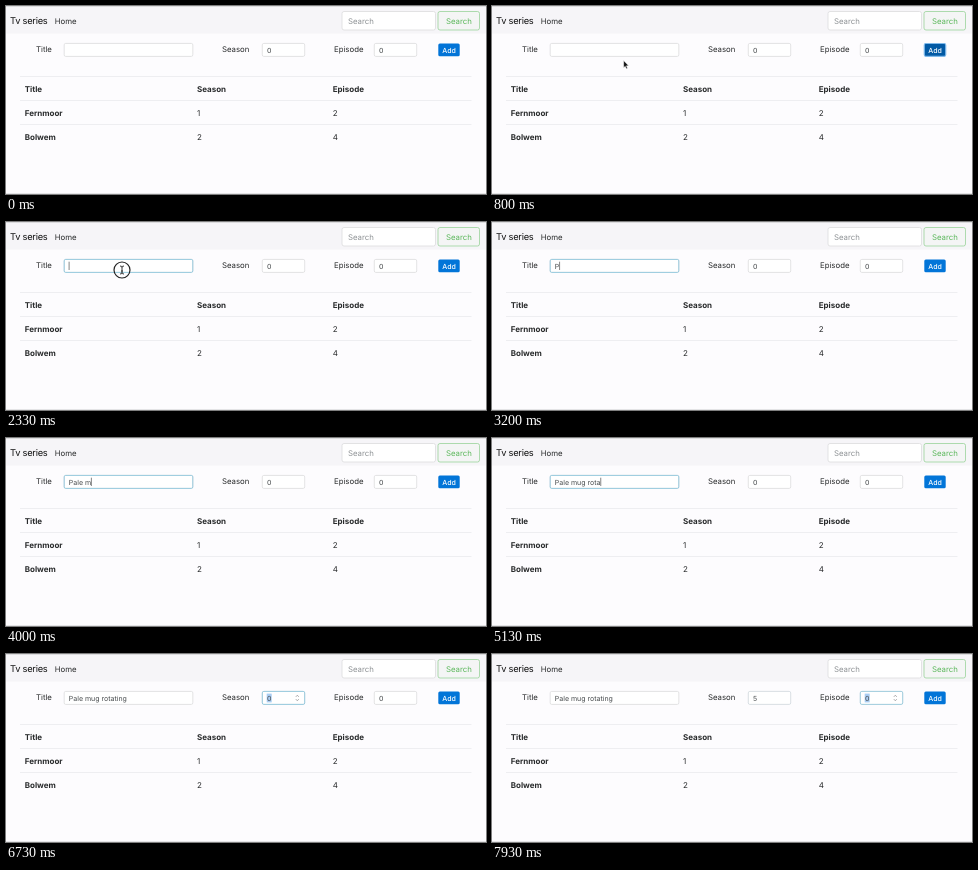
Animation of 480x188 px, one loop 8000 ms. Source, as an HTML page:

```html
<!DOCTYPE html>
<html lang="en">
<head>
<meta charset="utf-8">
<title>Tv series</title>
<style>
html, body { margin: 0; height: 100%; overflow: hidden; background: #fdfcfe; }
svg { display: block; width: 100vw; height: 100vh; }
text { font: 7.8px Inter, "Open Sans", sans-serif; fill: #292b2c; white-space: pre; text-rendering: geometricPrecision; }
.brand { font-size: 9.3px; letter-spacing: -.25px; fill: #111; }
.hint { fill: #8f9396; }
.green { fill: #5cb85c; }
.cell { font-size: 8px; }
.bold { font-weight: 650; }
.small { font-size: 7px; fill: #464a4c; }
.add { font-size: 7px; font-weight: 500; fill: #fff; text-anchor: middle; }
.box { fill: #fff; stroke: #dcdcde; stroke-width: .8; }
.focus { fill: none; stroke: #8fc8de; stroke-width: .9; }
.rule { stroke: #eeeef1; }
.select { fill: #a9cdf3; }
.caret { stroke: #333; stroke-width: .6; }
.arrows { fill: none; stroke: #8d8d90; stroke-width: .7; }
</style>
</head>
<body>
<svg viewBox="0 0 480 188">
  <rect width="480" height="188" fill="#fdfcfe"/>
  <rect width="480" height="27.5" fill="#f6f5f8"/>
  <path d="M0 .5H480" stroke="#dcdcde"/>
  <path d="M0 187.5H480" stroke="#e4e4e6"/>
  <text class="brand" x="4" y="18.2">Tv series</text>
  <text x="48.8" y="18">Home</text>
  <rect class="box" x="336" y="5.5" width="93.5" height="18.5" rx="2"/>
  <text class="hint" x="342" y="17.8">Search</text>
  <rect x="432" y="5.5" width="41.5" height="18.5" rx="2" fill="#f4f5f5" stroke="#8fce8f" stroke-width=".7"/>
  <text class="green" x="440" y="17.8">Search</text>

  <g id="form"></g>
  <rect x="432.3" y="37.5" width="21.4" height="12.8" rx="1.5" fill="#0275d8"/>
  <rect id="addFocus" x="432.3" y="37.5" width="21.4" height="12.8" rx="1.5" fill="#025aa5" stroke="#7fb9ea" stroke-width="1.2"/>
  <text class="add" x="443" y="46.5">Add</text>

  <path class="rule" d="M14 70.5H465.5M14 118.5H465.5"/>
  <path class="rule" d="M14 94.5H465.5" stroke-width="1.2"/>
  <g id="table"></g>

  <path id="caret" class="caret" d="M0 39.7V48"/>
  <path id="arrow" d="M0 0V7.2L1.6 5.7L2.7 8.2L3.9 7.7L2.8 5.2H5Z" fill="#111" stroke="#fff" stroke-width=".5"/>
  <g id="beam" fill="none" stroke="#222">
    <path d="M-2 -4Q0 -4 0 -2.8Q0 -4 2 -4M0 -3V3M-2 4Q0 4 0 2.8Q0 4 2 4M-1 1H1" stroke-width=".9"/>
    <circle id="press" r="8" stroke-width="1.2"/>
  </g>
</svg>
<script>
const LOOP = 8000;
const PHRASE = "Pale mug rotating";
const KEY_TIMES = [3200, 3360, 3530, 3680, 3790, 3930, 4190, 4390, 4590,
                   4690, 4830, 4950, 5080, 5290, 5460, 5525, 5725];
const PRESS = 2050, RELEASE = 2450, TO_SEASON = 6050, FIVE = 7190, TO_EPISODE = 7800;
// time, x, y of the pointer
const PATH = [[70, 215, 138], [870, 131, 54], [1270, 127, 42], [1400, 127, 42], [1750, 116, 48]];

const $ = id => document.getElementById(id);
const show = (el, on) => el.setAttribute("opacity", +on);
const clamp = v => Math.min(1, Math.max(0, v));
const fade = (t, from, to) => clamp((t - from) / 150) * (1 - clamp((t - to) / 150));

function addField(name, label, labelX, x, width, numeric) {
  const extras = numeric ? `
    <rect id="${name}Select" class="select" x="${x + 4.4}" y="39.6" width="5" height="8.8"/>
    <path id="${name}Spin" class="arrows" d="M${x + 33.5} 42.9l1.5 -1.7l1.5 1.7m-3 2.2l1.5 1.7l1.5 -1.7"/>` : "";
  $("form").innerHTML += `<text x="${labelX}" y="46.4">${label}</text>
    <rect class="box" x="${x}" y="37.4" width="${width}" height="13" rx="1.5"/>
    <rect id="${name}Focus" class="focus" x="${x}" y="37.4" width="${width}" height="13" rx="1.5"/>${extras}
    <text id="${name}" class="small" x="${x + 4.6}" y="46.5">${numeric ? 0 : ""}</text>`;
}
addField("title", "Title", 30, 58.2, 128.6, false);
addField("season", "Season", 216, 256.3, 42.4, true);
addField("episode", "Episode", 328, 368.3, 42.4, true);

[["Title", "Season", "Episode"], ["Fernmoor", 1, 2], ["Bolwem", 2, 4]].forEach((row, r) =>
  row.forEach((cell, c) => {
    const weight = r === 0 || c === 0 ? "bold" : "";
    $("table").innerHTML += `<text class="cell ${weight}" x="${[18.7, 191, 326.7][c]}" y="${85.7 + 24 * r}">${cell}</text>`;
  }));

function pointerAt(t) {
  const next = PATH.findIndex(p => p[0] > t);
  if (next < 0) return PATH[PATH.length - 1].slice(1);
  if (next === 0) return PATH[0].slice(1);
  const [a, b] = [PATH[next - 1], PATH[next]];
  const u = (t - a[0]) / (b[0] - a[0]);
  const k = u * (2 - u);
  return [a[1] + (b[1] - a[1]) * k, a[2] + (b[2] - a[2]) * k];
}

function drawCaret(t) {
  const inTitle = t >= PRESS && t < TO_SEASON;
  const inSeason = t >= FIVE && t < TO_EPISODE;
  const events = inTitle ? [PRESS, ...KEY_TIMES] : [FIVE];
  const last = events.filter(e => e <= t).pop();
  show($("caret"), (inTitle || inSeason) && (t - last) % 1000 < 500);
  const field = $(inTitle ? "title" : "season");
  const x = +field.getAttribute("x") + (field.textContent ? field.getComputedTextLength() : 0) + .3;
  $("caret").setAttribute("transform", `translate(${x})`);
}

function render(t) {
  $("title").textContent = PHRASE.slice(0, KEY_TIMES.filter(k => k <= t).length);
  $("season").textContent = t < FIVE ? 0 : 5;

  show($("addFocus"), fade(t, 0, PRESS));
  show($("titleFocus"), fade(t, PRESS, TO_SEASON));
  show($("seasonFocus"), fade(t, TO_SEASON, TO_EPISODE));
  show($("episodeFocus"), fade(t, TO_EPISODE, LOOP));
  show($("seasonSelect"), t >= TO_SEASON && t < FIVE);
  show($("episodeSelect"), t >= TO_EPISODE);
  show($("seasonSpin"), t >= TO_SEASON && t < TO_EPISODE);
  show($("episodeSpin"), t >= TO_EPISODE);
  drawCaret(t);

  const place = `translate(${pointerAt(t)})`;
  $("arrow").setAttribute("transform", place);
  $("beam").setAttribute("transform", place);
  show($("arrow"), t >= 70 && t < 1500);
  show($("beam"), t >= 1500 && t < KEY_TIMES[0]);
  show($("press"), t >= PRESS && t < RELEASE);
}

const start = performance.now();
function tick() {
  render((performance.now() - start) % LOOP);
  requestAnimationFrame(tick);
}
tick();
</script>
</body>
</html>
```
